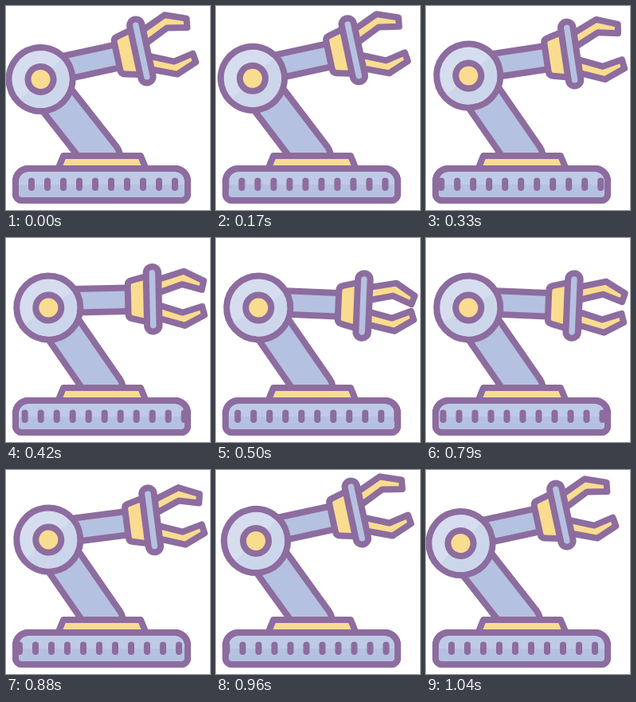
An HTML page with a canvas for the animation above (1.18 s loop, 256 by 256 pixels).

```html
<!DOCTYPE html>
<html>
<head>
<meta charset="utf-8">
<style>
html, body { margin: 0; width: 100%; height: 100%; overflow: hidden; background: #fff; }
canvas { display: block; width: 256px; height: 256px; }
</style>
</head>
<body>
<canvas width="256" height="256"></canvas>
<script>
const canvas = document.querySelector('canvas');
const g = canvas.getContext('2d');
const LINE = '#8d6c9f', BLUE = '#b5c1e0', PALE = '#bfcae6', YELLOW = '#f9dc8f';
const LOOP = 1180, FPS = 24, WEIGHT = 8;
const rad = deg => deg * Math.PI / 180;
const ramp = (n, a, b) => Math.min(1, Math.max(0, (n - a) / (b - a)));
const smooth = x => x * x * (3 - 2 * x);
// Rises from a to b, holds, falls from c to d.
const trip = (n, a, b, c, d) => ramp(n, a, b) - ramp(n, c, d);

function paint(path, fill) {
  g.fillStyle = fill;
  g.strokeStyle = LINE;
  g.lineWidth = WEIGHT;
  g.fill(path);
  g.stroke(path);
}

function disc(r, fill) {
  const p = new Path2D();
  p.arc(0, 0, r, 0, 7);
  paint(p, fill);
}

function segment(x1, y1, x2, y2, width, color) {
  g.strokeStyle = color;
  g.lineWidth = width;
  g.beginPath();
  g.moveTo(x1, y1);
  g.lineTo(x2, y2);
  g.stroke();
}

// Outlined blue bar with round ends.
function tube(x1, y1, x2, y2, width) {
  segment(x1, y1, x2, y2, width + WEIGHT, LINE);
  segment(x1, y1, x2, y2, width - WEIGHT, BLUE);
}

function within(draw) {
  g.save();
  draw();
  g.restore();
}

// Hinged at (0, -20); the lower jaw mirrors the upper one.
function jaw(side, angle) {
  within(() => {
    g.scale(1, side);
    g.translate(0, -20);
    g.rotate(angle);
    paint(new Path2D('M2-3L38-18L64-8L62.5 3.3L37.5-1.5L2 14.5Z'), YELLOW);
  });
}

// Origin at the centre of the wrist ring.
function hand(grip) {
  tube(-110, 0, -20, 0, 29.5);
  paint(new Path2D('M-2-30L-26-24Q-31-23-31-18V18Q-31 23-26 24L-2 30Z'), YELLOW);
  jaw(1, grip);
  jaw(-1, grip);
  tube(0, -33, 0, 33, 15.5);
}

function shoulder() {
  disc(40, '#d5ddef');
  g.fillStyle = '#ccd6eb';
  g.beginPath();
  g.arc(0, 0, 36, rad(-33), rad(147));
  g.fill();
  disc(16, YELLOW);
}

function base(roll) {
  paint(new Path2D('M65.5 204L72 188H169L175.5 204Z'), YELLOW);
  const body = new Path2D();
  body.roundRect(12, 204, 216, 40, [16, 16, 8, 8]);
  paint(body, PALE);
  within(() => {
    g.clip(body);
    g.fillStyle = BLUE;
    g.fillRect(12, 224, 216, 20);
    for (let x = roll - 8; x < 256; x += 20) segment(x, 219.5, x, 228, 8, LINE);
  });
  g.lineWidth = WEIGHT;
  g.stroke(body);
}

function draw(n) {
  const lean = rad(3.5) * trip(n, 3, 7, 22, 25);
  const tilt = rad(-12.2 + 14.6 * trip(n, 7, 11, 19, 22));
  const grip = rad(11.5) * trip(n, 8, 12, 18, 22);
  const roll = 16.7 * smooth(trip(n, 3, 14, 14, 25));
  g.clearRect(0, 0, 256, 256);
  g.lineCap = g.lineJoin = 'round';
  within(() => {
    g.translate(122, 250);
    g.rotate(lean);
    g.translate(-78.5, -158);
    tube(0, 0, 77, 98, 45.5);
    g.rotate(tilt - lean);
    within(() => {
      g.translate(131, -8);
      hand(grip);
    });
    shoulder();
  });
  base(roll);
}

function tick() {
  const t = performance.now() % LOOP;
  draw(Math.floor(t * FPS / 1000 + 0.1));
  requestAnimationFrame(tick);
}
tick();
</script>
</body>
</html>
```
